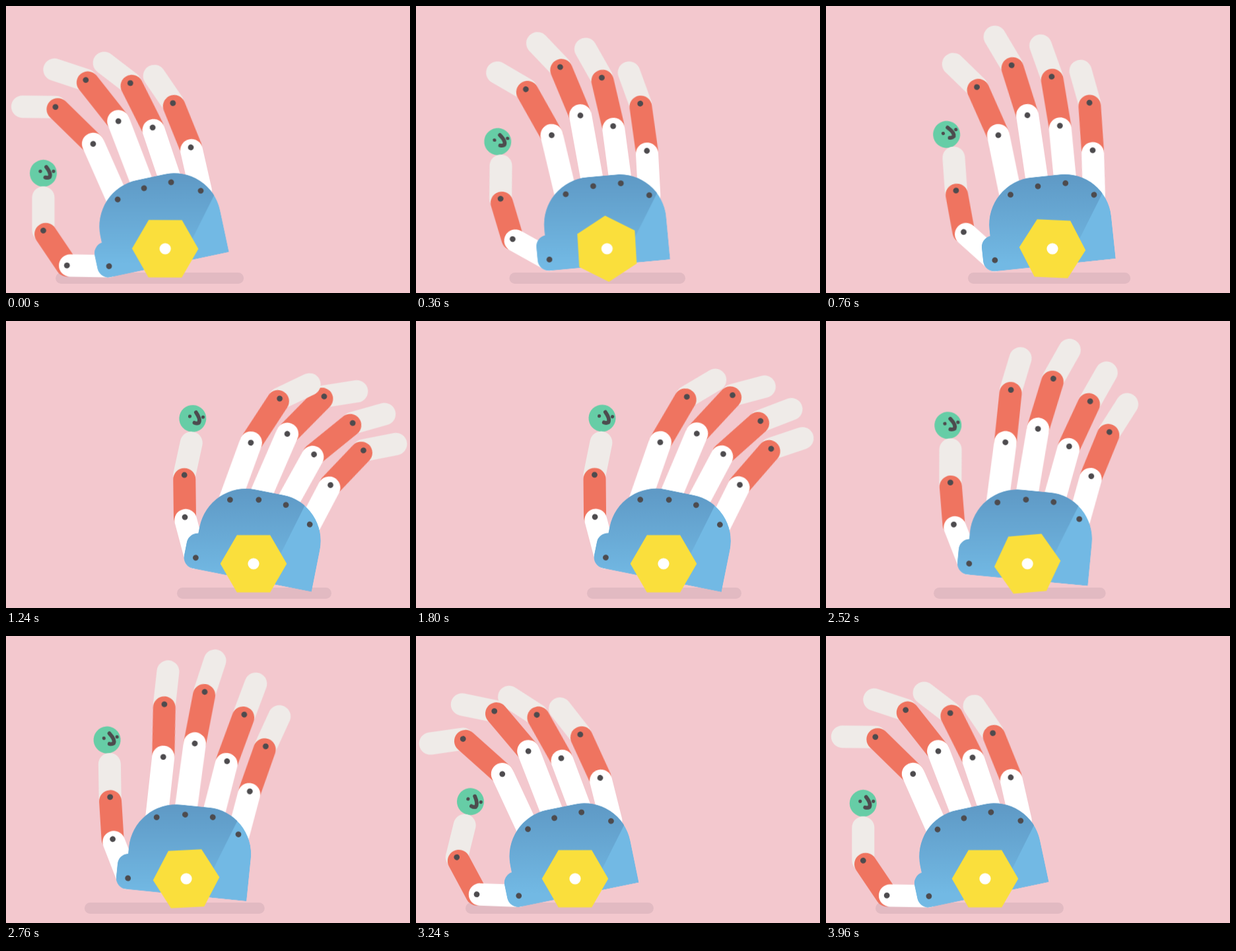
Write an HTML page without scripts that moves like this. It is 612 px wide and 436 px high and loops after 4000 ms.

```html
<!DOCTYPE html>
<html lang="en">
<head>
<meta charset="utf-8">
<title>Rolling hand</title>
<style>
html, body { margin: 0; width: 100%; height: 100%; overflow: hidden; background: #f3c8ce; }
svg { display: block; width: 100vw; height: 100vh; }

.tip, .mid, .low { fill: none; stroke-width: 34; stroke-linecap: round; }
.tip { stroke: #efebe8; }
.mid { stroke: #ef7460; }
.low { stroke: #fff; }
.dot { fill: #4d4b4e; }

.roll, .hex, .ground { animation: 4s linear infinite; }
.roll { animation-name: roll; }
.hex { animation-name: spin; }
.ground { animation-name: ground; fill: #e2bac2; }
.tilt { --s: 1; transform-origin: 0 2.5px; animation: tilt 4s infinite; }
.hand { translate: .5px 0; }
.level { --s: -1; }
.joint { animation: bend 4s infinite; }

@keyframes roll {
  0%, 75%, 100% { transform: translate(241px, 368.7px); }
  25%, 50% { transform: translate(375px, 368.7px); }
}
@keyframes spin {
  0%, 75%, 100% { rotate: 0deg; }
  25%, 50% { rotate: 240deg; }
}
@keyframes ground {
  0%, 75%, 100% { x: 75px; width: 285px; }
  25%, 50% { x: 259px; width: 234px; }
}
@keyframes tilt {
  0% { rotate: calc(var(--s) * -12deg); animation-timing-function: ease-in-out; }
  6% { rotate: calc(var(--s) * -5deg); animation-timing-function: ease-out; }
  19% { rotate: calc(var(--s) * -6deg); animation-timing-function: cubic-bezier(.45, .1, .75, .85); }
  31% { rotate: calc(var(--s) * 11.2deg); animation-timing-function: ease-out; }
  42%, 50% { rotate: calc(var(--s) * 11.4deg); animation-timing-function: ease-in-out; }
  56% { rotate: calc(var(--s) * 4.5deg); animation-timing-function: ease-out; }
  69% { rotate: calc(var(--s) * 5.8deg); animation-timing-function: cubic-bezier(.45, .1, .75, .85); }
  81% { rotate: calc(var(--s) * -11.6deg); animation-timing-function: ease-out; }
  90%, 100% { rotate: calc(var(--s) * -12deg); }
}
/* a: rest left, b: rolling right, c: swung right, d, e: rolling left, f: swung left */
@keyframes bend {
  0% { rotate: calc(var(--a) * 1deg); animation-timing-function: ease-in-out; }
  6% { rotate: calc(var(--a) * .6deg + var(--b) * .4deg); animation-timing-function: ease-out; }
  19% { rotate: calc(var(--b) * 1deg); animation-timing-function: cubic-bezier(.45, .1, .75, .85); }
  31% { rotate: calc(var(--c) * 1deg); animation-timing-function: ease-in-out; }
  42%, 50% { rotate: calc(var(--c) * .6deg + var(--d) * .4deg); animation-timing-function: ease-in-out; }
  56% { rotate: calc(var(--d) * 1deg); animation-timing-function: ease-out; }
  69% { rotate: calc(var(--e) * 1deg); animation-timing-function: cubic-bezier(.45, .1, .75, .85); }
  81% { rotate: calc(var(--f) * 1deg); animation-timing-function: ease-in-out; }
  90% { rotate: calc(var(--a) * 1.2deg - var(--f) * .2deg); animation-timing-function: ease-in-out; }
  100% { rotate: calc(var(--a) * 1deg); }
}
</style>
</head>
<body>
<svg viewBox="0 0 612 436" preserveAspectRatio="none">
  <defs>
    <linearGradient id="shade" gradientUnits="userSpaceOnUse" x1="0" y1="-110" x2="0" y2="22">
      <stop offset="0" stop-color="#5f9ac6"/>
      <stop offset="1" stop-color="#72b9e4"/>
    </linearGradient>
    <path id="palm" d="M93.5 25H-89.5A17 17 0 0 1 -106.5 8V-12A17 17 0 0 1 -92 -29V-39A72 72 0 0 1 -20 -111H22.5A71 71 0 0 1 93.5 -40Z"/>
    <clipPath id="inside"><use href="#palm"/></clipPath>
  </defs>

  <rect class="ground" x="75" y="405" width="285" height="17" rx="8.5"/>

  <g class="roll">
    <g class="tilt hand">
      <!-- little finger -->
      <g class="joint" style="translate:71px -75px;--a:-.8;--b:4.3;--c:16.5;--d:13;--e:9.1;--f:-2.5">
        <g class="joint" style="translate:0 -67.5px;--a:-9.2;--b:-2.2;--c:15.8;--d:12.3;--e:4.5;--f:-10.5">
          <g class="joint" style="translate:0 -72.5px;--a:-12.3;--b:-11.8;--c:35.3;--d:23.3;--e:5.2;--f:-13.4">
            <path class="tip" d="M0 0V-50"/>
          </g>
          <path class="mid" d="M0 0V-67.5"/>
          <circle class="dot" cy="-72.5" r="4.4"/>
        </g>
        <path class="low" d="M0 0V-63"/>
        <circle class="dot" cy="-67.5" r="4.4"/>
      </g>
      <!-- ring finger -->
      <g class="joint" style="translate:29.8px -97px;--a:-6.6;--b:.5;--c:17.8;--d:14.6;--e:8.5;--f:-8.9">
        <g class="joint" style="translate:0 -87.7px;--a:-8;--b:-4;--c:21.9;--d:18.2;--e:5.9;--f:-8.8">
          <g class="joint" style="translate:0 -75.5px;--a:-25.8;--b:-10.2;--c:23.3;--d:16.6;--e:.3;--f:-27.7">
            <path class="tip" d="M0 0V-50"/>
          </g>
          <path class="mid" d="M0 0V-70.5"/>
          <circle class="dot" cy="-75.5" r="4.4"/>
        </g>
        <path class="low" d="M0 0V-83.2"/>
        <circle class="dot" cy="-87.7" r="4.4"/>
      </g>
      <!-- middle finger -->
      <g class="joint" style="translate:-12.2px -96.7px;--a:-8.9;--b:-2.4;--c:12.2;--d:10.2;--e:1.9;--f:-9.6">
        <g class="joint" style="translate:0 -109px;--a:-17.4;--b:-9.1;--c:21.1;--d:18.4;--e:3.2;--f:-19">
          <g class="joint" style="translate:0 -79.7px;--a:-33.3;--b:-13.2;--c:36.5;--d:26;--e:7.2;--f:-38.2">
            <path class="tip" d="M0 0V-50"/>
          </g>
          <path class="mid" d="M0 0V-74.7"/>
          <circle class="dot" cy="-79.7" r="4.4"/>
        </g>
        <path class="low" d="M0 0V-109"/>
        <circle class="dot" cy="-109" r="4.4"/>
      </g>
      <!-- index finger -->
      <g class="joint" style="translate:-54.8px -88.3px;--a:-11.8;--b:-5.6;--c:8.8;--d:6.2;--e:.5;--f:-13.3">
        <g class="joint" style="translate:0 -92.2px;--a:-21.7;--b:-12.3;--c:13.1;--d:8.1;--e:-5.1;--f:-23.2">
          <g class="joint" style="translate:0 -80px;--a:-44;--b:-21.9;--c:31.3;--d:25.3;--e:5.2;--f:-50">
            <path class="tip" d="M0 0V-50"/>
          </g>
          <path class="mid" d="M0 0V-75"/>
          <circle class="dot" cy="-80" r="4.4"/>
        </g>
        <path class="low" d="M0 0V-92.2"/>
        <circle class="dot" cy="-92.2" r="4.4"/>
      </g>
      <!-- thumb with the balanced head -->
      <g class="joint" style="translate:-88.7px 8.2px;--a:-77;--b:-41.9;--c:-26.1;--d:-26.4;--e:-27;--f:-76.4">
        <g class="joint" style="translate:0 -63.8px;--a:55;--b:37.5;--c:14.2;--d:14.4;--e:17.7;--f:59.8">
          <g class="joint" style="translate:0 -64px;--a:34;--b:6.4;--c:12.9;--d:10.6;--e:2.6;--f:42">
            <g class="joint" style="translate:0 -50px;--a:0;--b:-13;--c:-9;--d:-9;--e:-5;--f:0">
              <g transform="translate(0 -37)">
                <circle r="20.5" fill="#66cda6"/>
                <circle class="dot" cx="-4.5" cy="-3" r="2.6"/>
                <circle class="dot" cx="15.5" cy="-3" r="2.6"/>
                <path d="M4.5 -9.5Q12.5 1 9.5 6Q7 7.5 3 6.3" fill="none" stroke="#4d4b4e" stroke-width="5.8" stroke-linecap="round" stroke-linejoin="round"/>
              </g>
            </g>
            <path class="tip" d="M0 0V-50"/>
          </g>
          <path class="mid" d="M0 0V-57.5"/>
          <circle class="dot" cy="-64" r="4.4"/>
        </g>
        <path class="low" d="M0 0V-59"/>
        <circle class="dot" cy="-63.8" r="4.4"/>
      </g>

      <g clip-path="url(#inside)">
        <use href="#palm" fill="#72b9e4"/>
        <path class="tilt level" d="M-200 -150H108L3 60H-200Z" fill="url(#shade)"/>
      </g>
      <g class="dot">
        <circle cx="-88.7" cy="8.2" r="4.4"/>
        <circle cx="-54.8" cy="-88.3" r="4.4"/>
        <circle cx="-12.2" cy="-96.7" r="4.4"/>
        <circle cx="29.8" cy="-97" r="4.4"/>
        <circle cx="71" cy="-75" r="4.4"/>
      </g>
    </g>

    <path class="hex" d="M50.3 0L25.2 43.6H-25.2L-50.3 0L-25.2 -43.6H25.2Z" fill="#fadf3c"/>
    <circle r="8.6" fill="#fff"/>
  </g>
</svg>
</body>
</html>
```
